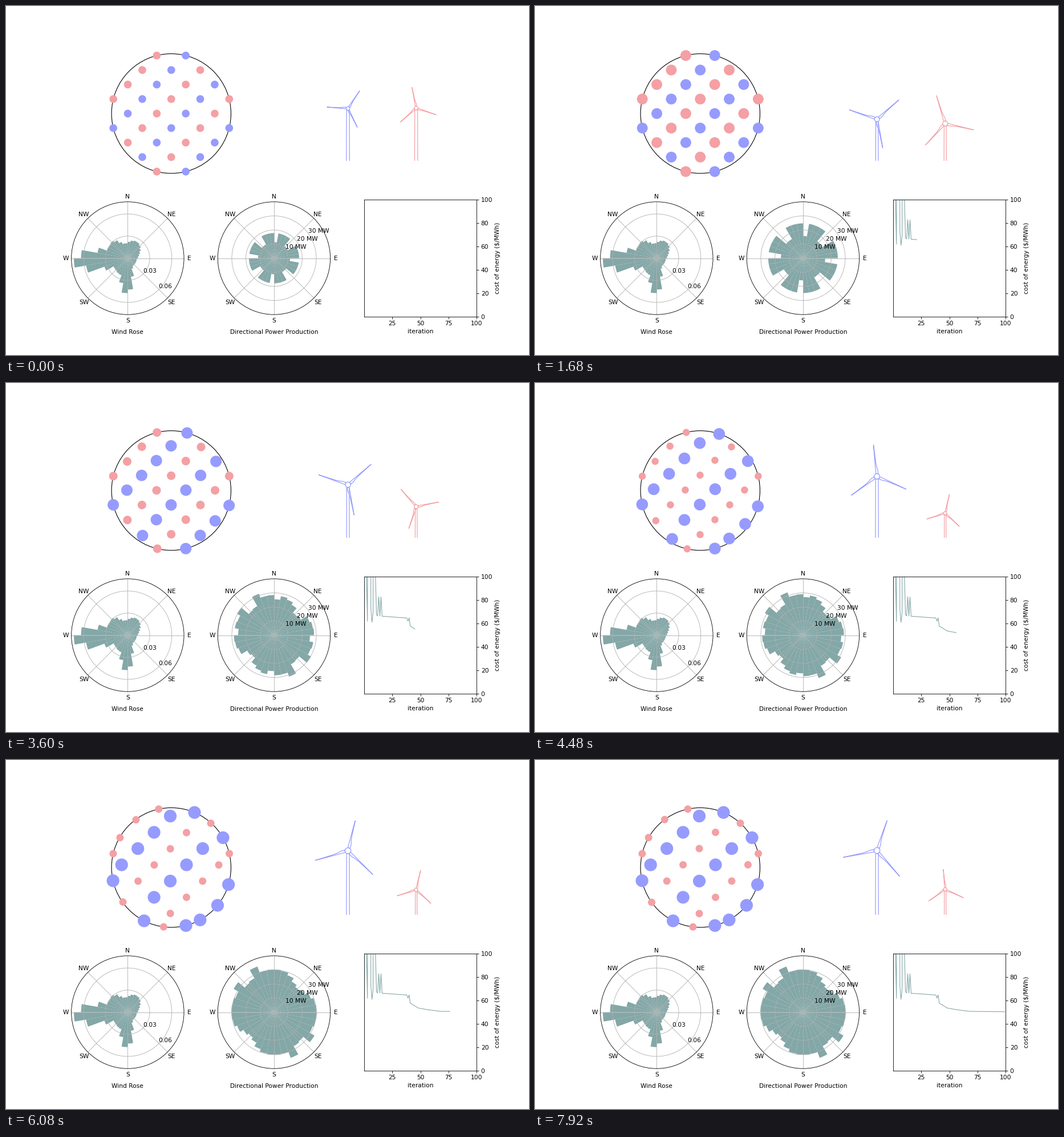
Write a matplotlib script that moves like this. It is 917x611 px and loops after 8 s.

```python
import numpy as np
import matplotlib.pyplot as plt
from matplotlib.animation import FuncAnimation
from matplotlib.patches import Circle, Rectangle, Wedge

W, H, FRAMES, STEP = 917, 611, 100, 80
S = 0.764            # text and line scale
PX = 0.72            # points per pixel
BLUE, RED, TEAL, GREY = "#969bff", "#f4a0a4", "#84a7a7", "#b0b0b0"

plt.rcParams.update({
    "font.family": "DejaVu Sans", "font.size": 10 * S,
    "axes.linewidth": 0.8 * S, "axes.labelpad": 4 * S,
    "xtick.major.size": 3.5 * S, "ytick.major.size": 3.5 * S,
    "xtick.major.width": 0.8 * S, "ytick.major.width": 0.8 * S,
    "xtick.major.pad": 3.5 * S, "ytick.major.pad": 3.5 * S,
})

fig = plt.figure(figsize=(W / 100, H / 100), dpi=100, facecolor="white")
ax = fig.add_axes([0, 0, 1, 1])
ax.set(xlim=(0, W), ylim=(H, 0))
ax.axis("off")

# Lower row of a 2 x 3 grid with gaps of 0.3 cells.
CELL_W, CELL_H, BOTTOM = 0.775 / 3.6, 0.77 / 2.3, 0.11
LEFTS = [0.125 + 1.3 * CELL_W * n for n in range(3)]


def key(f, points):
    return np.interp(f, list(points), list(points.values()))


def label(x, y, s):
    ax.text(x, y, s, ha="center", va="center", zorder=5)


# ---- rotor sizes: a line search first, then the two types part ----
CHANGE = 38                  # iteration at which the types start to differ
EVEN_SIZE = 51
COLLAPSED = {1, 4, 5, 9}     # failed trial steps with tiny rotors
TRIALS = {0: 36.8, 2: 38, 3: 53.5, 6: 48, 7: 54, 8: 49.5, 10: 38, 11: 50.5,
          12: 51, 13: 44, 14: 51, 15: 44, 16: EVEN_SIZE, CHANGE: EVEN_SIZE}
BLUE_SIZE = {**TRIALS, 42: 53.5, 56: 55.6, 68: 60}
RED_SIZE = {**TRIALS, 46: 39, 56: 33.7, 68: 35}


def rotor(f, sizes):
    return 6.4 if f in COLLAPSED else key(f, sizes)


# ---- wind farm layout ----
FARM = np.array([289.75, 188.3])
FARM_R = 104.7
COLORS = "RB RBR RBRB RBRBR BRBR BRBRB RBRB BRB RB".replace(" ", "")
OFFSET = 25.4 * np.array([
    (i, j) for j in range(-4, 5) for i in range(-4, 5)
    if (i + j) % 2 and i * i + j * j < 18])

# Outer turbines go to the rim and slide along it, inner ones spread out.
angle = np.arctan2(OFFSET[:, 1], OFFSET[:, 0])
slid = angle + (1.7 + 8.2 * np.cos(angle + 0.67)
                + 8.3 * np.cos(3 * angle - 2.57)) / FARM_R
outer = np.hypot(*OFFSET.T) > 85
SETTLED = np.where(outer[:, None],
                   FARM_R * np.column_stack([np.cos(slid), np.sin(slid)]),
                   1.12 * OFFSET + [-1.7, -4.8])
IS_BLUE = np.array([c == "B" for c in COLORS])


def layout(f):
    if f in COLLAPSED:
        return FARM + OFFSET + 0.05 * OFFSET[:, ::-1] * [1, -1]
    t = np.where(IS_BLUE, key(f, {CHANGE: 0, 45: 0.15, 56: 0.5, 68: 1}),
                 key(f, {CHANGE: 0, 56: 0.2, 68: 0.9, 84: 1}))
    return FARM + OFFSET + t[:, None] * (SETTLED - OFFSET)


ax.add_patch(Circle(FARM, FARM_R, fill=False, ec="black", lw=1.1 * PX, zorder=1))
dots = [ax.add_patch(Circle(FARM, 1, fc=BLUE if b else RED, lw=0, zorder=2))
        for b in IS_BLUE]

# ---- turbines ----
GROUND, SKY = 271, 105.5
BLADE_X = np.array([3, 7, 10, 15, 20, 25, 30, 35,
                    30, 25, 20, 15, 10, 5, 3, 3]) / 35
BLADE_Y = (np.array([0, 0, 0.8, 1.5, 1.7, 1.9, 2.1, 2.3] + [2.4] * 7 + [0])
           - 1.5) / 35


class Turbine:
    def __init__(self, x, color, phase, speed, sizes, hub, width, low):
        self.x, self.phase, self.speed = x, phase, speed
        self.sizes, self.hub, self.width, self.low = sizes, hub, width, low
        self.tower, *self.blades = [
            ax.plot([], [], color=color, lw=1.2 * PX, zorder=3)[0]
            for _ in range(4)]
        self.cap = ax.add_patch(Circle((x, 0), 1, fc="white", ec=color,
                                       lw=1.2 * PX, zorder=4))
        clip = Rectangle((0, SKY), W, GROUND - SKY, transform=ax.transData)
        for part in (self.tower, self.cap, *self.blades):
            part.set_clip_path(clip)

    def draw(self, f):
        size = rotor(f, self.sizes)
        small = f in COLLAPSED
        y = self.low if small else key(f, self.hub)
        w = 0.4 if small else key(f, self.width) / 2
        r = size * 3 / 35
        t = 0.9 * w
        self.tower.set_data(self.x + np.array([-w, -t, t, w]),
                            [GROUND, y + r, y + r, GROUND])
        self.cap.set_center((self.x, y))
        self.cap.set_radius(r)
        for n, blade in enumerate(self.blades):
            a = np.deg2rad(self.phase + self.speed * f + 120 * n)
            c, s = np.cos(a), np.sin(a)
            blade.set_data(self.x + size * (BLADE_X * c - BLADE_Y * s),
                           y - size * (BLADE_X * s + BLADE_Y * c))


blue = Turbine(
    599.6, BLUE, 55, 5, BLUE_SIZE,
    {0: 179.3, 12: 197, CHANGE: 200.5, 42: 182, 56: 163.5, 68: 159, 99: 158.5},
    {0: 5.5, 12: 4.6, 35: 4.5, 56: 5.3}, 226.5)
red = Turbine(
    719.2, RED, 100, 6, RED_SIZE,
    {0: 178.7, 12: 204, CHANGE: 209, 56: 228, 99: 226.5},
    {0: 5.5, 12: 4.2, 35: 4, 56: 3.2}, 217)

# ---- polar charts, radii in pixels, bins counter-clockwise from east ----
ROSE_Y = H * (1 - BOTTOM - CELL_H / 2)
ROSE_R = W * CELL_W / 2
BINS = np.arange(36)
DEGREES = 10 * BINS + 5


def polar(column, rings, title, ticks):
    x = W * (LEFTS[column] + CELL_W / 2)
    bars = [ax.add_patch(Wedge((x, ROSE_Y), 1, -a - 5, -a + 5, fc=TEAL, lw=0,
                               zorder=1)) for a in DEGREES]
    for r in rings:
        ax.add_patch(Circle((x, ROSE_Y), r, fill=False, ec=GREY,
                            lw=0.8 * S, zorder=2))
    for n, name in enumerate("E NE N NW W SW S SE".split()):
        c, s = np.cos(n * np.pi / 4), -np.sin(n * np.pi / 4)
        ax.plot([x, x + ROSE_R * c], [ROSE_Y, ROSE_Y + ROSE_R * s],
                color=GREY, lw=0.8 * S, zorder=2)
        label(x + 108.4 * c, ROSE_Y + 0.6 + 108.4 * s, name)
    ax.add_patch(Circle((x, ROSE_Y), ROSE_R, fill=False, ec="black",
                        lw=0.8 * S, zorder=3))
    label(x, 571, title)
    for tick in ticks:
        label(*tick)
    return bars


def set_bars(bars, radii):
    for bar, r in zip(bars, radii):
        bar.set_radius(max(r, 0.01))
        bar.set_visible(r > 0)


def lobe(degrees, center, height, width):
    return height * np.exp(-((degrees - center) / width) ** 2)


# Winds: strongest from the west, then south, with three weaker lobes.
WIND = 16 + sum(lobe(DEGREES, *args) for args in [
    (184, 78, 20), (268, 46, 17), (232, 14, 18), (136, 23, 25), (62, 17, 40)])

# Wakes cut the grid's power along its rows; the settled farm has softer dips.
ROWS = np.where(np.isin(BINS % 9, [3, 4, 8]), 28, 44)
HALF = DEGREES % 180
OPEN = (75 - lobe(HALF, 45, 17, 20) - lobe(HALF, 135, 8, 20)
        + np.where(np.isin(BINS % 18, [11, 14]), 13, 0))


def power(f):
    if f in COLLAPSED:
        return 0 * ROWS
    t = key(f, {CHANGE: 0, 43: 0.65, 56: 0.78, 68: 1})
    grid = ROWS * key(f, TRIALS) / TRIALS[0]
    return (1 - t) * grid + t * OPEN


wind = polar(0, [38.7, 77.4], "Wind Rose",
             [(252.5, 464, "0.03"), (279.3, 491, "0.06")])
set_bars(wind, WIND)
output = polar(1, ROSE_R * np.array([1, 2, 3]) / 4,
               "Directional Power Production",
               [(508, 422, "10 MW"), (528.5, 408, "20 MW"),
                (548.5, 394, "30 MW")])


# ---- cost history ----
def cost(f):
    best = key(f, {12: 66.5, CHANGE: 64.7, 39: 62, 40: 64.8, 41: 57.8,
                   48: 53.6, 56: 52.2, 68: 50.7, 99: 50.4})
    return best * (EVEN_SIZE / rotor(f, TRIALS)) ** 1.5


COST = [cost(f) for f in range(FRAMES)]
chart = fig.add_axes([LEFTS[2], BOTTOM, CELL_W, CELL_H])
chart.set(xlim=(0, 100), ylim=(0, 100), xticks=[25, 50, 75, 100],
          xlabel="iteration", ylabel="cost of energy ($/MWh)")
chart.yaxis.tick_right()
chart.yaxis.set_label_position("right")
history, = chart.plot([], [], color=TEAL, lw=1.1 * PX)


def update(f):
    for dot, p, b in zip(dots, layout(f), IS_BLUE):
        dot.set_center(p)
        dot.set_radius(rotor(f, BLUE_SIZE if b else RED_SIZE) / 5.4)
    blue.draw(f)
    red.draw(f)
    set_bars(output, power(f))
    history.set_data(range(f + 1), COST[:f + 1])


anim = FuncAnimation(fig, update, frames=FRAMES, init_func=lambda: update(0),
                     interval=STEP, repeat=True, repeat_delay=0, blit=False)
plt.show()
```
